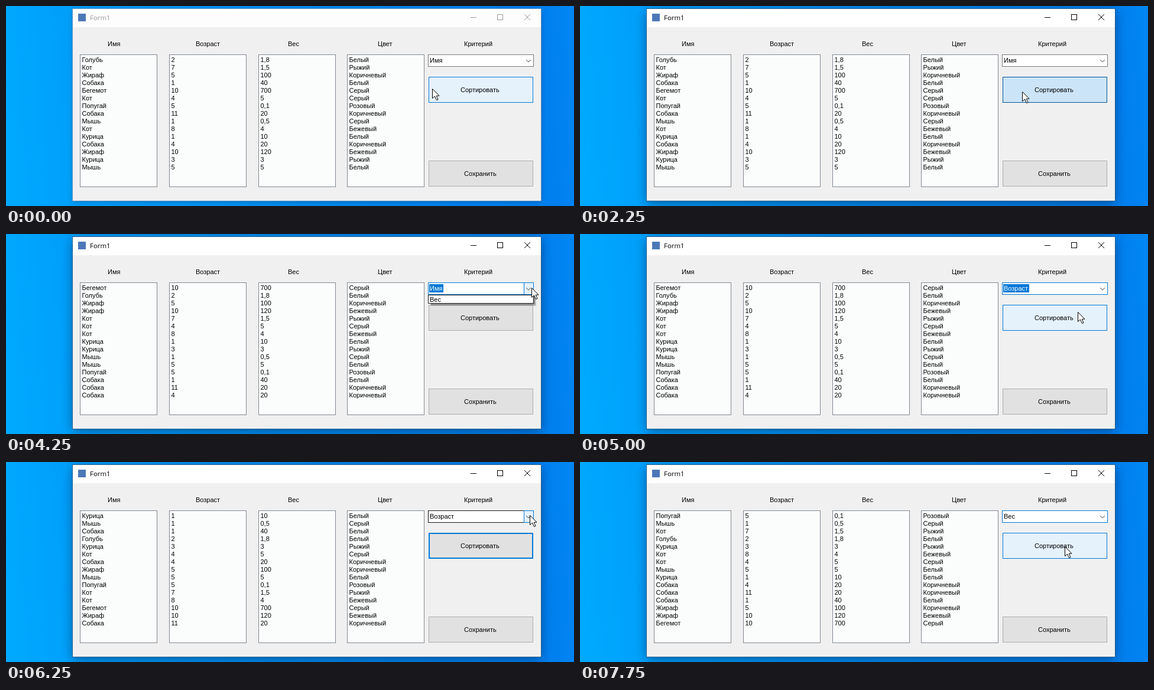
Write an HTML page with a canvas that moves like this. It is 961 px wide and 339 px high and loops after 8000 ms.

```html
<!DOCTYPE html>
<html lang="ru">
<head>
<meta charset="utf-8">
<title>Form1</title>
<style>
html, body { margin: 0; width: 100%; height: 100%; overflow: hidden; }
canvas { display: block; }
</style>
</head>
<body>
<canvas id="stage" width="961" height="339"></canvas>
<script>
const ctx = document.getElementById('stage').getContext('2d');
const LOOP = 8000;
const UI = '11px "Liberation Sans", Arial, sans-serif';
const TITLE = '11.4px "Open Sans", "Noto Sans", sans-serif';
const BLUE = '#0078d7';
const CRITERIA = ['Имя', 'Возраст', 'Вес'];

const animals = `Голубь 2 1,8 Белый
Кот 7 1,5 Рыжий
Жираф 5 100 Коричневый
Собака 1 40 Белый
Бегемот 10 700 Серый
Кот 4 5 Серый
Попугай 5 0,1 Розовый
Собака 11 20 Коричневый
Мышь 1 0,5 Серый
Кот 8 4 Бежевый
Курица 1 10 Белый
Собака 4 20 Коричневый
Жираф 10 120 Бежевый
Курица 3 3 Рыжий
Мышь 5 5 Белый`.split('\n').map(line => line.split(' '));

// Each order is a stable sort of the previous one
const num = s => parseFloat(s.replace(',', '.'));
const sortBy = (rows, cmp) => [...rows].sort(cmp);
const byName = sortBy(animals, (a, b) => a[0] < b[0] ? -1 : a[0] > b[0] ? 1 : 0);
const byAge = sortBy(byName, (a, b) => num(a[1]) - num(b[1]));
const byWeight = sortBy(byAge, (a, b) => num(a[2]) - num(b[2]));

// Each step keeps the earlier state and changes what it names
const steps = [
  { at: 0, x: 721, y: 140, rows: animals, active: false, button: 'hot', combo: 'plain', pick: 0, drop: 0, item: 0, marked: false, beam: false },
  { at: 250, x: 757, y: 143 },
  { at: 500, x: 745, y: 145 },
  { at: 1750, x: 748, y: 145 },
  { at: 2250, active: true, button: 'down' },
  { at: 2500, rows: byName, button: 'hot' },
  { at: 2750, x: 756, y: 108, button: 'focus' },
  { at: 3000, x: 758, y: 87, combo: 'hot', beam: true },
  { at: 3250, x: 792, y: 86 },
  { at: 3500, x: 846, y: 84 },
  { at: 3750, x: 882, y: 91, beam: false, combo: 'arrow' },
  { at: 4000, x: 889, y: 91 },
  { at: 4250, combo: 'open', marked: true, button: 'plain', drop: 15 },
  { at: 4500, x: 878, y: 112, drop: 41 },
  { at: 4750, x: 852, y: 122, item: 1 },
  { at: 5000, x: 842, y: 132, pick: 1, drop: 0, combo: 'focus', button: 'hot' },
  { at: 5250, x: 840, y: 142 },
  { at: 5500, marked: false, button: 'down' },
  { at: 5750, rows: byAge, button: 'hot', combo: 'plain' },
  { at: 6000, x: 868, y: 106, button: 'focus' },
  { at: 6250, x: 886, y: 90, combo: 'arrow' },
  { at: 6500, combo: 'open', marked: true, button: 'plain', drop: 41 },
  { at: 6750, x: 866, y: 116 },
  { at: 7000, x: 832, y: 135, item: 2 },
  { at: 7250, x: 822, y: 141, pick: 2, drop: 0, combo: 'focus', button: 'hot' },
  { at: 7500, x: 820, y: 143, marked: false, button: 'down' },
  { at: 7750, rows: byWeight, button: 'hot' }
];

function stateAt(t) {
  return Object.assign({}, ...steps.filter(s => s.at <= t));
}

function fill(x, y, w, h, color) {
  ctx.fillStyle = color;
  ctx.fillRect(x, y, w, h);
}

function box(x, y, w, h, face, edge, line = 1) {
  fill(x, y, w, h, edge);
  fill(x + line, y + line, w - 2 * line, h - 2 * line, face);
}

function text(str, x, y, color = '#000', font = UI) {
  ctx.font = font;
  ctx.fillStyle = color;
  ctx.fillText(str, x, y);
}

function stroke(color, ...points) {
  ctx.strokeStyle = color;
  ctx.lineWidth = 1;
  ctx.beginPath();
  points.forEach(([x, y]) => ctx.lineTo(x, y));
  ctx.stroke();
}

function drawDesktop() {
  const g = ctx.createLinearGradient(0, 200, 961, 130);
  g.addColorStop(0, '#00a9fe');
  g.addColorStop(0.12, '#009ffa');
  g.addColorStop(0.55, '#008bf0');
  g.addColorStop(0.95, '#007fee');
  g.addColorStop(1, '#0086f2');
  fill(0, 0, 961, 339, g);
}

function drawWindow(active) {
  ctx.save();
  ctx.shadowColor = active ? 'rgba(0,20,60,.5)' : 'rgba(0,20,60,.3)';
  ctx.shadowBlur = active ? 18 : 9;
  ctx.shadowOffsetY = active ? 4 : 2;
  fill(113, 5, 792, 325, '#f0f0f0');
  ctx.restore();
  box(112, 4, 794, 327, '#f0f0f0', active ? '#23608f' : '#5f94bd');
  fill(113, 5, 792, 31, active ? '#fff' : '#fdfdfd');

  const ink = active ? '#000' : '#999';
  fill(122, 13, 13, 13, '#4c78b8');
  text('Form1', 142, 24, ink, TITLE);
  fill(786, 19, 10, 1, ink);
  ctx.strokeStyle = ink;
  ctx.lineWidth = 1;
  ctx.strokeRect(831.5, 14.5, 9, 9);
  stroke(ink, [877, 14], [887, 24]);
  stroke(ink, [887, 14], [877, 24]);
}

function drawLists(rows) {
  [[125, 'Имя', 172], [276, 'Возраст', 321], [427, 'Вес', 477], [577, 'Цвет', 629]].forEach(([x, head, hx], col) => {
    text(head, hx, 68);
    box(x, 82, 131, 225, '#fbfcfc', '#828790');
    rows.forEach((row, i) => text(row[col], x + 3.5, 95 + 13 * i));
  });
  text('Критерий', 775, 68);
}

function drawButton(y, label, x, look) {
  const [face, edge, line] = {
    plain: ['#e1e1e1', '#adadad', 1],
    focus: ['#e1e1e1', BLUE, 2],
    hot: ['#e5f1fb', BLUE, 1],
    down: ['#cce4f7', '#005499', 1]
  }[look];
  box(715, y, 177, 44, face, edge, line);
  text(label, x, y + 26);
}

function drawCombo(s) {
  const edge = { plain: '#7a7a7a', hot: '#333', arrow: '#171717', open: BLUE, focus: BLUE }[s.combo];
  box(714, 82, 179, 21, '#fff', edge);
  if (s.combo === 'arrow' || s.combo === 'open') box(876, 82, 17, 21, '#e5f1fb', BLUE);
  stroke('#444', [880, 91], [884, 95], [888, 91]);

  const label = CRITERIA[s.pick];
  if (s.marked) {
    ctx.font = UI;
    fill(716, 85, Math.ceil(ctx.measureText(label).width) + 2, 14, BLUE);
  }
  text(label, 717, 96, s.marked ? '#fff' : '#000');
}

// The list slides down from under the combo box
function drawDrop(s) {
  if (!s.drop) return;
  fill(719, 106, 178, s.drop + 1, 'rgba(0,0,0,.18)');
  fill(718, 105, 177, s.drop, 'rgba(0,0,0,.28)');
  box(714, 103, 179, s.drop, '#fff', '#222');
  ctx.save();
  ctx.beginPath();
  ctx.rect(715, 104, 177, s.drop - 2);
  ctx.clip();
  CRITERIA.forEach((name, i) => {
    const y = 63 + s.drop + 13 * i;
    const on = i === s.item;
    if (on) fill(715, y, 177, 13, BLUE);
    text(name, 717, y + 11, on ? '#fff' : '#000');
  });
  ctx.restore();
}

function drawPointer({ x, y, beam }) {
  if (beam) {
    fill(x - 2, y, 5, 1, '#fff');
    fill(x, y, 1, 16, '#fff');
    fill(x - 2, y + 15, 5, 1, '#fff');
    return;
  }
  ctx.beginPath();
  [[0, 0], [0, 16], [4, 12.5], [7, 19], [9.5, 18], [6.7, 11.7], [11.5, 11.7]]
    .forEach(([dx, dy]) => ctx.lineTo(x + dx + 0.5, y + dy + 0.5));
  ctx.closePath();
  ctx.fillStyle = '#fff';
  ctx.fill();
  ctx.strokeStyle = '#000';
  ctx.lineWidth = 1;
  ctx.stroke();
}

function frame() {
  const s = stateAt(performance.now() % LOOP);
  drawDesktop();
  drawWindow(s.active);
  drawLists(s.rows);
  drawButton(120, 'Сортировать', 769, s.button);
  drawButton(262, 'Сохранить', 775, 'plain');
  drawCombo(s);
  drawDrop(s);
  drawPointer(s);
  requestAnimationFrame(frame);
}
frame();
</script>
</body>
</html>
```
